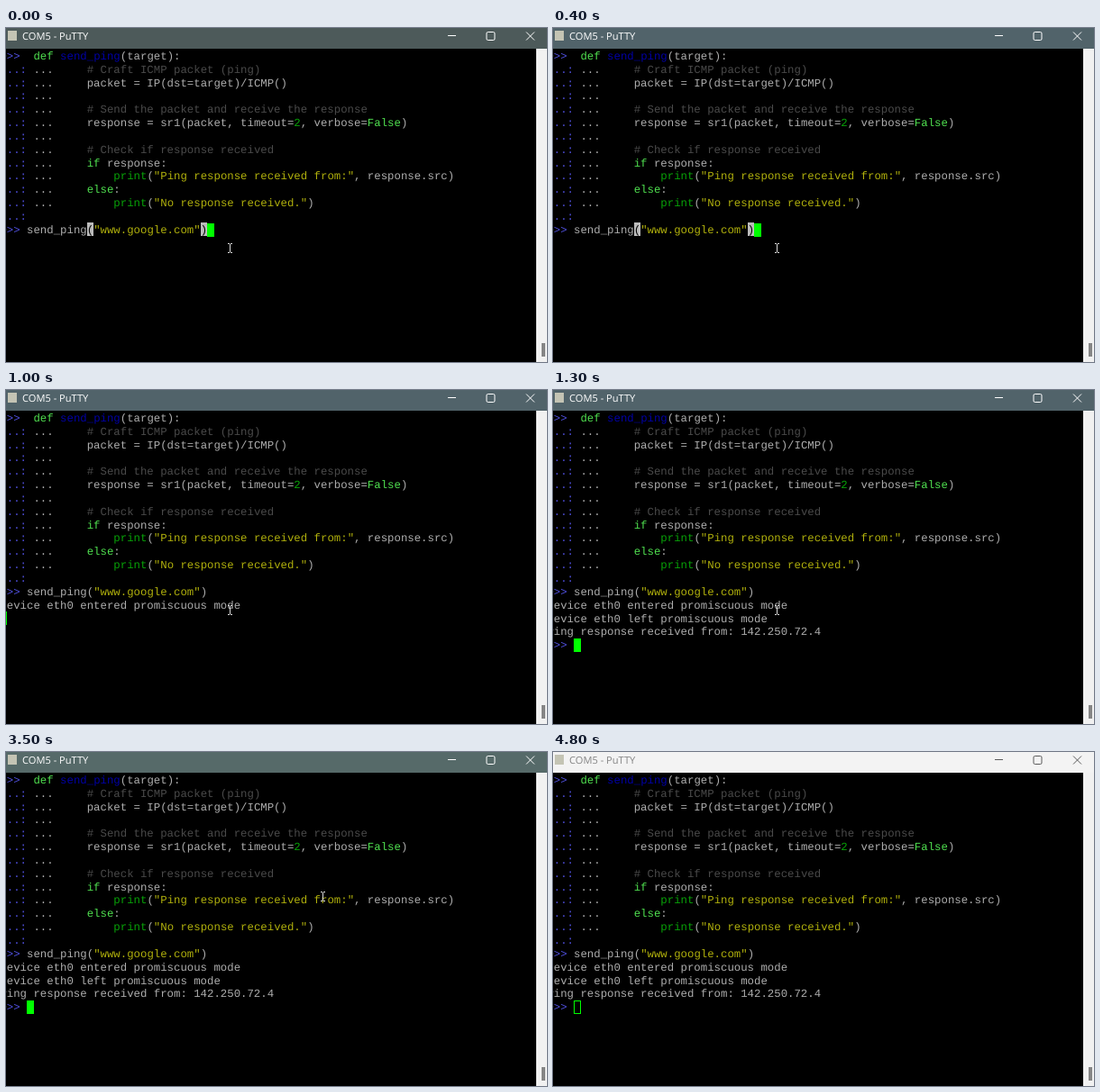
An HTML page that plays this animation: 600 by 371 pixels, repeating every 5400 ms.

```html
<!DOCTYPE html>
<html lang="en">
<head>
<meta charset="utf-8">
<title>Serial terminal</title>
<style>
  :root { --cw: 7.41px; --lh: 14.85px; }
  html, body { margin: 0; width: 100%; height: 100%; overflow: hidden; background: #000; }
  #stage { position: relative; width: 600px; height: 371px; overflow: hidden; background: #000; }
  #stage * { animation-duration: 5.4s; animation-timing-function: step-end; animation-iteration-count: infinite; }

  #bar { position: absolute; inset: 0 0 auto; height: 23px; color: #fff; background: #51636a; animation-name: focus; }
  #bar b { position: absolute; left: 2px; top: 3px; width: 10px; height: 11px; background: #c4c4b4; }
  #bar span { position: absolute; left: 18px; top: 2px; font: 11.1px/16px "Open Sans", "Noto Sans", sans-serif; white-space: pre; text-rendering: geometricPrecision; animation-name: caption; }
  #bar svg { position: absolute; left: 0; top: 0; animation-name: icons; }

  #scroll { position: absolute; left: 588px; top: 23px; width: 12px; height: 348px; background: #f1f1f1; }
  #scroll i { position: absolute; left: 6px; top: 327px; width: 4px; height: 15px; background: #858585; }

  pre { position: absolute; left: calc(.8px - var(--cw)); top: 24.9px; margin: 0; color: #adadad;
        font: 12.35px/var(--lh) "Liberation Mono", "Courier New", monospace; text-rendering: geometricPrecision; font-variant-ligatures: none; }
  .p { color: #4f4fdc; }
  .k { color: #4fdf4f; }
  .f { color: #0000a4; }
  .c { color: #4a4a4a; }
  .g { color: #08a208; }
  .s { color: #b0b00c; }
  .m { display: inline-block; height: 13px; margin-top: -2px; padding-top: 2px; vertical-align: top; animation-name: match; }
  .entered { animation-name: entered; }
  .left { animation-name: left; }
  .reply { animation-name: reply; }

  #cursor { position: absolute; width: 8px; height: 15px; background: #0f0; animation-name: cursor; }
  #mouse { position: absolute; left: 245px; top: 238px; animation-name: mouse; }

  @keyframes focus {
    0% { background: #4d5a5a; } 1.852% { background: #51636a; }
    37.037% { background: #566a69; } 88.889%, 100% { background: #f3f3f3; }
  }
  @keyframes caption { 0% { color: #fff; } 88.889%, 100% { color: #858585; } }
  @keyframes icons { 0% { color: #fff; } 88.889%, 100% { color: #5a5a5a; } }
  @keyframes match {
    0% { color: #000; background: #bbb; }
    16.667%, 100% { color: #adadad; background: transparent; }
  }
  @keyframes entered { 0% { visibility: hidden; } 18.519%, 100% { visibility: visible; } }
  @keyframes left { 0% { visibility: hidden; } 22.222%, 100% { visibility: visible; } }
  @keyframes reply { 0% { visibility: hidden; } 24.074%, 100% { visibility: visible; } }
  @keyframes cursor {
    0% { left: 223px; top: 217px; background: #0f0; }
    16.667% { left: -7px; top: 231px; }
    18.519% { left: -7px; top: 246px; }
    22.222% { left: -7px; top: 261px; }
    24.074% { left: 23px; top: 276px; background: #0f0; box-shadow: none; }
    88.889%, 100% { left: 23px; top: 276px; background: transparent; box-shadow: inset 0 0 0 1px #0f0; }
  }
  @keyframes mouse {
    0% { left: 245px; top: 238px; visibility: visible; }
    64.815% { left: 348px; top: 154px; visibility: visible; }
    66.667%, 100% { left: 348px; top: 154px; visibility: hidden; }
  }
</style>
</head>
<body>
<div id="stage">
<pre><span class="p">&gt;&gt;&gt;</span>  <span class="k">def</span> <span class="f">send_ping</span>(target):
<span class="p">...:</span> ...     <span class="c"># Craft ICMP packet (ping)</span>
<span class="p">...:</span> ...     packet = IP(dst=target)/ICMP()
<span class="p">...:</span> ...
<span class="p">...:</span> ...     <span class="c"># Send the packet and receive the response</span>
<span class="p">...:</span> ...     response = sr1(packet, timeout=<span class="g">2</span>, verbose=<span class="k">False</span>)
<span class="p">...:</span> ...
<span class="p">...:</span> ...     <span class="c"># Check if response received</span>
<span class="p">...:</span> ...     <span class="k">if</span> response:
<span class="p">...:</span> ...         <span class="g">print</span>(<span class="s">"Ping response received from:"</span>, response.src)
<span class="p">...:</span> ...     <span class="k">else</span>:
<span class="p">...:</span> ...         <span class="g">print</span>(<span class="s">"No response received."</span>)
<span class="p">...:</span>
<span class="p">&gt;&gt;&gt;</span> send_ping<span class="m">(</span><span class="s">"www.google.com"</span><span class="m">)</span>
<span class="entered">device eth0 entered promiscuous mode</span>
<span class="left">device eth0 left promiscuous mode</span>
<span class="reply">Ping response received from: 142.250.72.4
<span class="p">&gt;&gt;&gt;</span></span></pre>
<div id="cursor"></div>
<svg id="mouse" width="7" height="13" fill="none" stroke="#ddd"><path d="M1 1.5H3M4 1.5H6M3.5 2V11M1 11.5H3M4 11.5H6"/></svg>
<div id="scroll"><i></i></div>
<div id="bar">
  <b></b><span>COM5 - PuTTY</span>
  <svg width="600" height="23" fill="none" stroke="currentColor">
    <path d="M490 8.5H499"/>
    <rect x="533" y="4.5" width="9" height="9" rx="1.5"/>
    <path d="M577 4.5L586 13.5M586 4.5L577 13.5"/>
  </svg>
</div>
</div>
</body>
</html>
```
